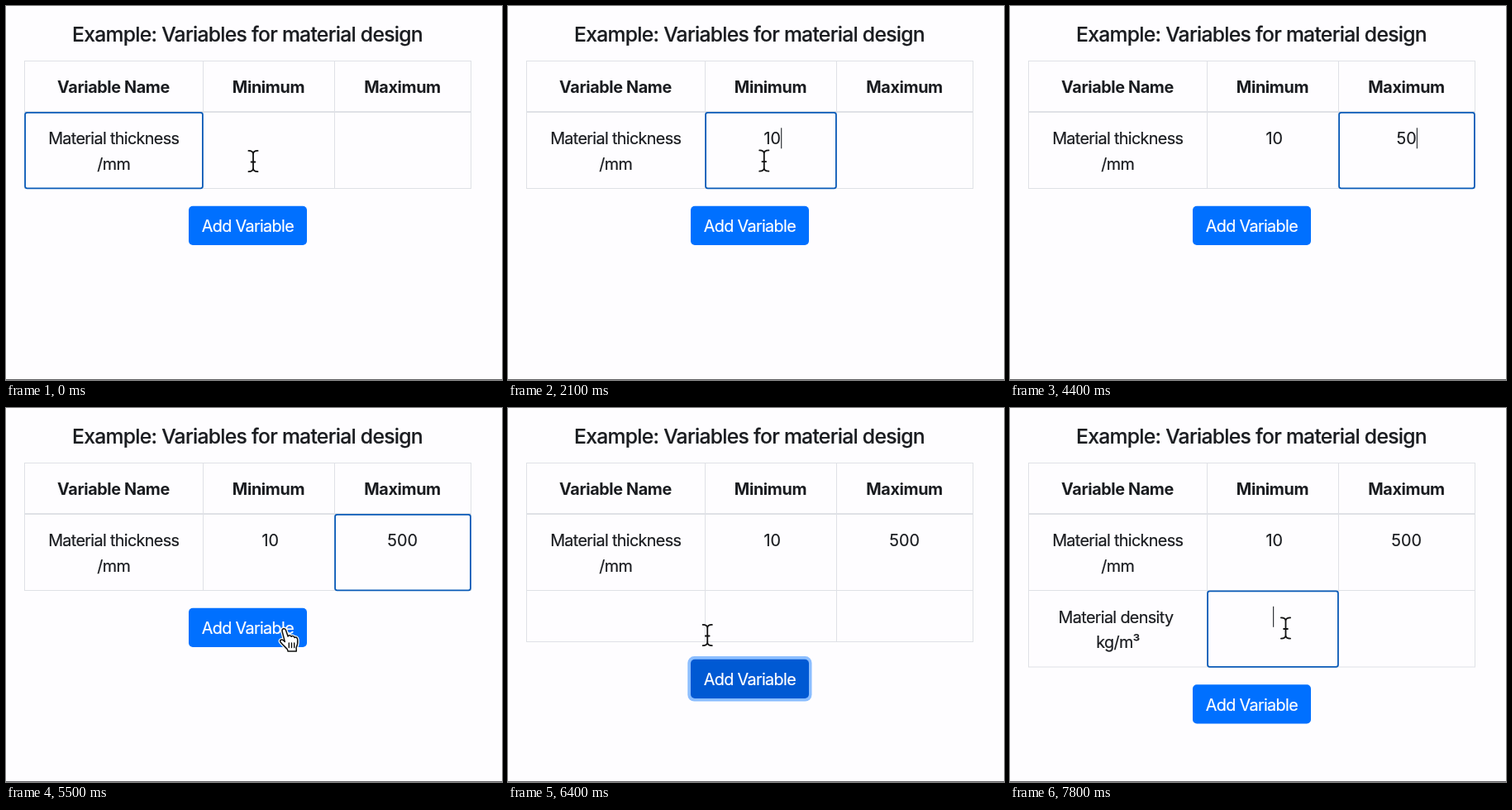
An HTML page that plays this animation: 600 px wide and 452 px high, repeating every 8000 ms.

```html
<!DOCTYPE html>
<html lang="en">
<head>
<meta charset="utf-8">
<title>Variables for material design</title>
<style>
  html, body { margin: 0; width: 100%; height: 100%; overflow: hidden; background: #fefdff; }
  svg { display: block; width: 600px; height: 452px; }
  text {
    font-family: Inter, "Liberation Sans", sans-serif;
    font-size: 19.8px; letter-spacing: -0.033em;
    fill: #1a1c20; stroke: #1a1c20; stroke-width: 0.2px; text-anchor: middle;
  }
  .title { font-size: 24.7px; font-weight: 500; letter-spacing: -0.029em; }
  .head { font-weight: 700; letter-spacing: -0.019em; stroke: none; }
  .num { letter-spacing: 0; }
  .label { fill: #fff; stroke: #fff; }
  .grid { fill: none; stroke: #dfe1e6; }
</style>
</head>
<body>
<svg viewBox="0 0 600 452">
  <rect width="600" height="452" fill="#fefdff"/>
  <rect y="451" width="600" height="1" fill="#606063"/>
  <text class="title" x="292" y="43">Example: Variables for material design</text>
  <path id="grid" class="grid"/>
  <path class="grid" d="M22 128H563" stroke-width="2"/>
  <text class="head" x="130" y="105">Variable Name</text>
  <text class="head" x="317.5" y="105">Minimum</text>
  <text class="head" x="479.5" y="105">Maximum</text>
  <text x="130.2" y="167.3">Material thickness</text>
  <text x="130.2" y="198">/mm</text>
  <text id="min" class="num" x="319.8" y="167.3"></text>
  <text id="max" class="num" x="479.7" y="167.3"></text>
  <g id="density">
    <text x="128" y="259.5">Material density</text>
    <text x="130.5" y="290">kg/m³</text>
  </g>
  <rect id="focus" fill="none" stroke="#0a5bb8" stroke-width="1.8" rx="2.5"/>
  <rect id="caret" width="1.2" height="25" fill="#33363a"/>
  <g id="button">
    <rect id="ring" x="217.3" y="-3.6" width="150.2" height="54.5" rx="8" fill="#8cbeff"/>
    <rect id="face" x="221" width="143" height="47.3" rx="5"/>
    <text class="label" x="292.4" y="31.4">Add Variable</text>
  </g>
  <path id="beam" fill="none" stroke="#111" stroke-width="1.8" stroke-linecap="round"
    d="M-5.6-12.6Q0-12.6 0-8.5Q0-12.6 5.6-12.6M0-8.5V8.5M-5.6 12.6Q0 12.6 0 8.5Q0 12.6 5.6 12.6M-2.4 1H2.4"/>
  <g id="hand" stroke-linejoin="round" stroke-linecap="round">
    <path id="palm" stroke="#fff" stroke-width="4" d="M-3.4 4C-4 .3-.2-.5 1 2.6L3.6 10
      C4 8 7 8.3 7.6 10.3C8.4 9 11 9.4 11.6 11.6C12.6 10.4 15 11.2 15.2 13.8
      C15.6 18 15 21 13.6 23.5L13.8 28H3.6L2.8 25.5C0 22.5-3 20-5.6 16.8C-6.6 14.4-4 13-1.8 15L-.2 16.4Z"/>
    <path fill="#fff" stroke="#111" stroke-width="1.5" d=""/>
    <path fill="none" stroke="#111" stroke-width="1.4" d="M4.8 18V23.5M8 18V23.5M11.2 18V23.5"/>
  </g>
</svg>
<script>
const LOOP = 8000, STEP = 100, BLINK = 500;
const cols = [22.5, 238.5, 397.5, 562.5];
const $ = id => document.getElementById(id);

const glides = [
  { from: 0, to: 400, x: 304.5, y: 187 },
  { from: 2000, to: 2500, x: 470, y: 188 },
  { from: 5100, to: 5500, x: 337.5, y: 266 },
  { from: 5700, to: 5900, x: 298.5, y: 286 },
  { from: 5900, to: 6900, x: 184, y: 263 },
  { from: 7200, to: 7800, x: 333.5, y: 266 }
];
const clicks = [
  { at: -BLINK, col: 0, row: 0 },
  { at: 300, col: 1, row: 0 },
  { at: 2400, col: 2, row: 0 },
  { at: 5600, button: true },
  { at: 6600, col: 0, row: 1 },
  { at: 7600, col: 1, row: 1 }
];
// Typing hides the pointer until it moves again
const typing = [
  { field: $("min"), text: "10", at: 1500, gap: 200, until: 2100 },
  { field: $("max"), text: "500", at: 3400, gap: 750, until: 5200 }
];
const rowAdded = 5700, pasted = 7300;

const ease = u => u < 0.5 ? 4 * u ** 3 : 1 - 4 * (1 - u) ** 3;
const show = (el, on) => el.setAttribute("visibility", on ? "visible" : "hidden");

function set(el, attrs) {
  for (const name in attrs) el.setAttribute(name, attrs[name]);
}

function pointerAt(t) {
  let x = 299, y = 187.5;
  for (const g of glides) {
    const u = ease(Math.min(1, Math.max(0, (t - g.from) / (g.to - g.from))));
    x += (g.x - x) * u;
    y += (g.y - y) * u;
  }
  return [x, y];
}

// Writes the typed digits and returns the time of the last key
function type(t) {
  let last = -Infinity;
  for (const { field, text, at, gap } of typing) {
    let count = 0;
    for (let i = 0; i < text.length; i++) {
      const key = Math.ceil((at + i * gap) / STEP) * STEP;
      if (t >= key) { count++; last = key; }
    }
    field.textContent = text.slice(0, count);
  }
  return last;
}

function drawFocus(t, click, bottom, lastKey) {
  show($("focus"), !click.button);
  const lit = (t - Math.max(click.at, lastKey)) % (2 * BLINK) < BLINK;
  show($("caret"), !click.button && lit);
  if (click.button) return;

  const { col, row } = click;
  const left = cols[col], right = cols[col + 1];
  const top = row ? 220.5 : 128, end = row ? bottom : 220.5;
  set($("focus"), { x: left + 0.6, y: top + 0.8, width: right - left - 1.2, height: end - top - 1 });

  const field = row === 0 && col > 0 && typing[col - 1].field;
  const x = field ? +field.getAttribute("x") + field.getComputedTextLength() / 2 : (left + right) / 2;
  set($("caret"), { x, y: top + 19.3 });
}

function render(t) {
  const bottom = t >= pasted ? 313 : t >= rowAdded ? 282.5 : 220.5;
  const lines = [66.5, 220.5, bottom].map(y => `M22 ${y}H563`);
  set($("grid"), { d: lines.join("") + cols.map(x => `M${x} 66V${bottom}`).join("") });
  show($("density"), t >= pasted);

  const click = clicks.filter(c => t >= c.at).pop();
  drawFocus(t, click, bottom, type(t));

  const top = bottom + 21.2;
  set($("button"), { transform: `translate(0 ${top})` });
  set($("face"), { fill: click.button ? "#0059d3" : "#0070ff" });
  show($("ring"), click.button);

  const [x, y] = pointerAt(t);
  const over = x > 221 && x < 364 && y > top && y < top + 47;
  const hidden = typing.some(k => t >= k.at && t < k.until);
  for (const id of ["beam", "hand"]) {
    set($(id), { transform: `translate(${x} ${y})` });
    show($(id), !hidden && over === (id === "hand"));
  }
}

set($("palm").nextElementSibling, { d: $("palm").getAttribute("d") });

const start = performance.now();
function tick() {
  const t = (performance.now() - start) % LOOP;
  render(Math.floor(t / STEP) * STEP);
  requestAnimationFrame(tick);
}
render(0);
requestAnimationFrame(tick);
</script>
</body>
</html>
```
